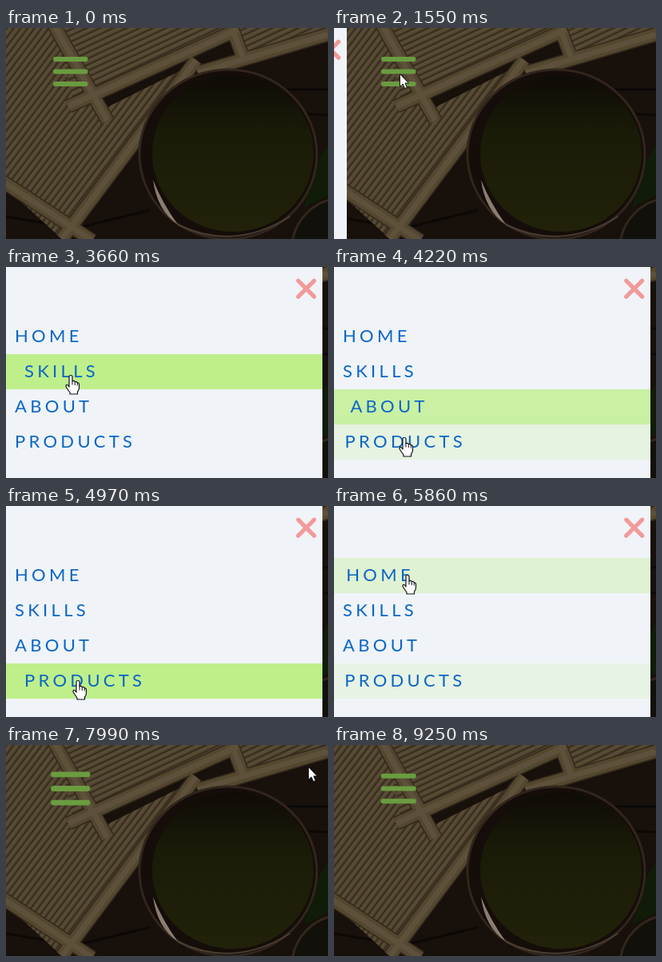
An HTML page that plays this animation: 403 by 264 pixels, repeating every 9320 ms.

```html
<!DOCTYPE html>
<html lang="en">
<head>
<meta charset="utf-8">
<title>Slide-in menu</title>
<style>
  html, body { margin: 0; width: 100%; height: 100%; overflow: hidden; background: #17100b; }
  svg { display: block; width: 403px; height: 264px; }
  text { font: 22px Lato, "Open Sans", sans-serif; letter-spacing: 4.3px; fill: #0a66c6; }
  .line { fill: none; stroke-linecap: round; }
</style>
</head>
<body>
<svg viewBox="0 0 403 264">
  <defs>
    <pattern id="slats" width="7" height="7" patternUnits="userSpaceOnUse">
      <path d="M0 0h7v7H0z" fill="#51452f"/>
      <path d="M.8 0v7" stroke="#30271a" stroke-width="1.600"/>
      <path d="M4 0v7" stroke="#5a4d38" stroke-width="2"/>
    </pattern>
    <pattern id="steep" href="#slats" patternTransform="rotate(37)"/>
    <pattern id="shallow" href="#slats" patternTransform="rotate(65)"/>
    <linearGradient id="tea" x2="0" y2="1">
      <stop stop-color="#0f0b06"/><stop offset=".35" stop-color="#1a1a08"/><stop offset="1" stop-color="#22220a"/>
    </linearGradient>
    <path id="rods" d="M-4 192L108 266M238 40L70 264M60-4L127 116M78 98L290 2M240 56L403 8M283 0L297 38"/>
  </defs>

  <path d="M0 0h403v264H0z" fill="#17100b"/>
  <path d="M330 77h73M0 236l60 10M340 106l63 3M90 250l90-22" stroke="#0c0806" stroke-width="3"/>
  <path d="M0 0h75l50 100 110-55L70 264 0 200z" fill="url(#steep)"/>
  <path d="M64 0h220L84 92z" fill="url(#shallow)"/>
  <path d="M290 0h113v14l-102 26z" fill="url(#shallow)"/>
  <use href="#rods" stroke="#33291c" stroke-width="18"/>
  <use href="#rods" stroke="#54472f" stroke-width="15"/>
  <use href="#rods" stroke="#5e513c" stroke-width="7"/>
  <path d="M403 146l-22 36-8 43 30-15z" fill="#101b08"/>
  <ellipse cx="278" cy="158" rx="111" ry="106" fill="#140d09" stroke="#32251c" stroke-width="3"/>
  <ellipse cx="284" cy="157" rx="101" ry="98" fill="url(#tea)"/>
  <path d="M184 190q5 38 31 56q-20-28-31-56z" fill="#8a7d70"/>
  <path class="line" d="M215 246q70 34 140-10" stroke="#4a3d32" stroke-width="2"/>
  <circle cx="421" cy="276" r="63" fill="#12100a" stroke="#32261d" stroke-width="3"/>

  <path id="burger" class="line" d="M62 39h37.500M62 54.500h37.500M62 70h37.500" stroke="#6a9c40" stroke-width="6"/>

  <g id="panel">
    <path d="M0 0h396v264H0z" fill="#f0f4f8"/>
    <g id="rows"></g>
    <path id="cross" class="line" d="M365.700 17.200l20 20m0-20l-20 20" stroke-width="5.200"/>
  </g>

  <g id="cursor" fill="#fff" stroke="#101018" stroke-linejoin="round">
    <path id="arrow" d="M.5 .5v16l3.700-3.500 2.500 5.700 2.700-1.200-2.400-5.500h4.500z"/>
    <g id="hand">
      <path stroke-width="1.200" d="M-2 2Q-2 .5 0 .5T2 2V8Q4 6.500 5.300 8.700 7.500 7.700 8.300 10 10.500 9.700 10.500 12V16Q10.500 19 8.500 21V24H-1V22Q-4 18-6 14.500-6 11.500-4 12.500L-2 15z"/>
      <path d="M2 8v4.500M5.300 9v4M8.300 10v3.500"/>
    </g>
  </g>
</svg>
<script>
const LOOP = 9320, PULSE = LOOP / 12, SLIDE = 400, HOVER = 400, WIDTH = 396;
const $ = id => document.getElementById(id);
const clamp = v => Math.min(1, Math.max(0, v));
const mix = (a, b, p) => a + (b - a) * p;
const rgb = (from, to, p) => `rgb(${from.map((c, i) => Math.round(mix(c, to[i], p)))})`;

// CSS-style cubic Bézier easing, solved by bisection
function bezier(x1, y1, x2, y2) {
  const at = (a, b, s) => 3 * a * s * (1 - s) ** 2 + 3 * b * s * s * (1 - s) + s ** 3;
  return x => {
    if (x <= 0 || x >= 1) return clamp(x);
    let lo = 0, hi = 1;
    for (let i = 0; i < 20; i++) {
      const mid = (lo + hi) / 2;
      if (at(x1, x2, mid) < x) lo = mid; else hi = mid;
    }
    return at(y1, y2, lo);
  };
}
const ease = bezier(.25, .1, .25, 1);
const easeInOut = bezier(.42, 0, .58, 1);

// Amount of a state that is switched on from a to b
const active = (t, a, b, duration, curve = ease) =>
  curve((t - a) / duration) - curve((t - b) / duration);

const menu = [
  { label: "HOME", hovers: [[2290, 3040], [5772, 6050]] },
  { label: "SKILLS", hovers: [[3040, 3700]] },
  { label: "ABOUT", hovers: [[3700, 4155]] },
  { label: "PRODUCTS", hovers: [[4155, 5655]] },
];

// Pointer moves, each eased from where the last one ended
const enter = { time: 50, x: 318, y: 241 };
const leave = 9180;
const moves = [
  { from: 50, to: 980, x: 82, y: 57 },
  { from: 2160, to: 2770, x: 78, y: 84 },
  { from: 2880, to: 3260, x: 80, y: 127 },
  { from: 3500, to: 4270, x: 88, y: 214 },
  { from: 4800, to: 5380, x: 97, y: 236 },
  { from: 5500, to: 5880, x: 92, y: 85 },
  { from: 5900, to: 6500, x: 378, y: 27 },
  { from: 8230, to: leave, x: 314, y: 264 },
];

menu.forEach((item, i) => {
  const y = 65 + 44 * i;
  $("rows").insertAdjacentHTML("beforeend",
    `<g><rect y="${y}" width="${WIDTH}" height="44"/><text y="${y + 29}">${item.label}</text></g>`);
  [item.bar, item.text] = $("rows").lastChild.children;
});

function pointer(t) {
  let { x, y } = enter;
  for (const m of moves) {
    const p = easeInOut((t - m.from) / (m.to - m.from));
    x = mix(x, m.x, p);
    y = mix(y, m.y, p);
  }
  return { x: Math.round(x), y: Math.round(y) };
}

const show = (id, visible) => $(id).style.display = visible ? "" : "none";

function draw(t) {
  const scale = 1 + .11 * (1 - Math.cos(2 * Math.PI * t / PULSE));
  $("burger").setAttribute("transform", `translate(80.75 54.5) scale(${scale}) translate(-80.75 -54.5)`);

  const open = active(t, 1494, 7252, SLIDE, easeInOut);
  $("panel").setAttribute("transform", `translate(${Math.round(WIDTH * (open - 1))})`);

  for (const { hovers, bar, text } of menu) {
    const p = hovers.reduce((sum, [a, b]) => sum + active(t, a, b, HOVER), 0);
    bar.setAttribute("fill", rgb([240, 244, 248], [190, 239, 139], p));
    text.setAttribute("x", 11 + 12 * p);
  }
  $("cross").setAttribute("stroke", rgb([241, 154, 154], [192, 36, 36], active(t, 6470, 7320, 200)));

  const { x, y } = pointer(t);
  const overMenu = open === 1 && y > 65;
  $("cursor").setAttribute("transform", `translate(${x} ${y})`);
  show("cursor", t > enter.time && t < leave);
  show("hand", overMenu);
  show("arrow", !overMenu);
}

const start = performance.now();
(function frame() {
  draw((performance.now() - start) % LOOP);
  requestAnimationFrame(frame);
})();
</script>
</body>
</html>
```
